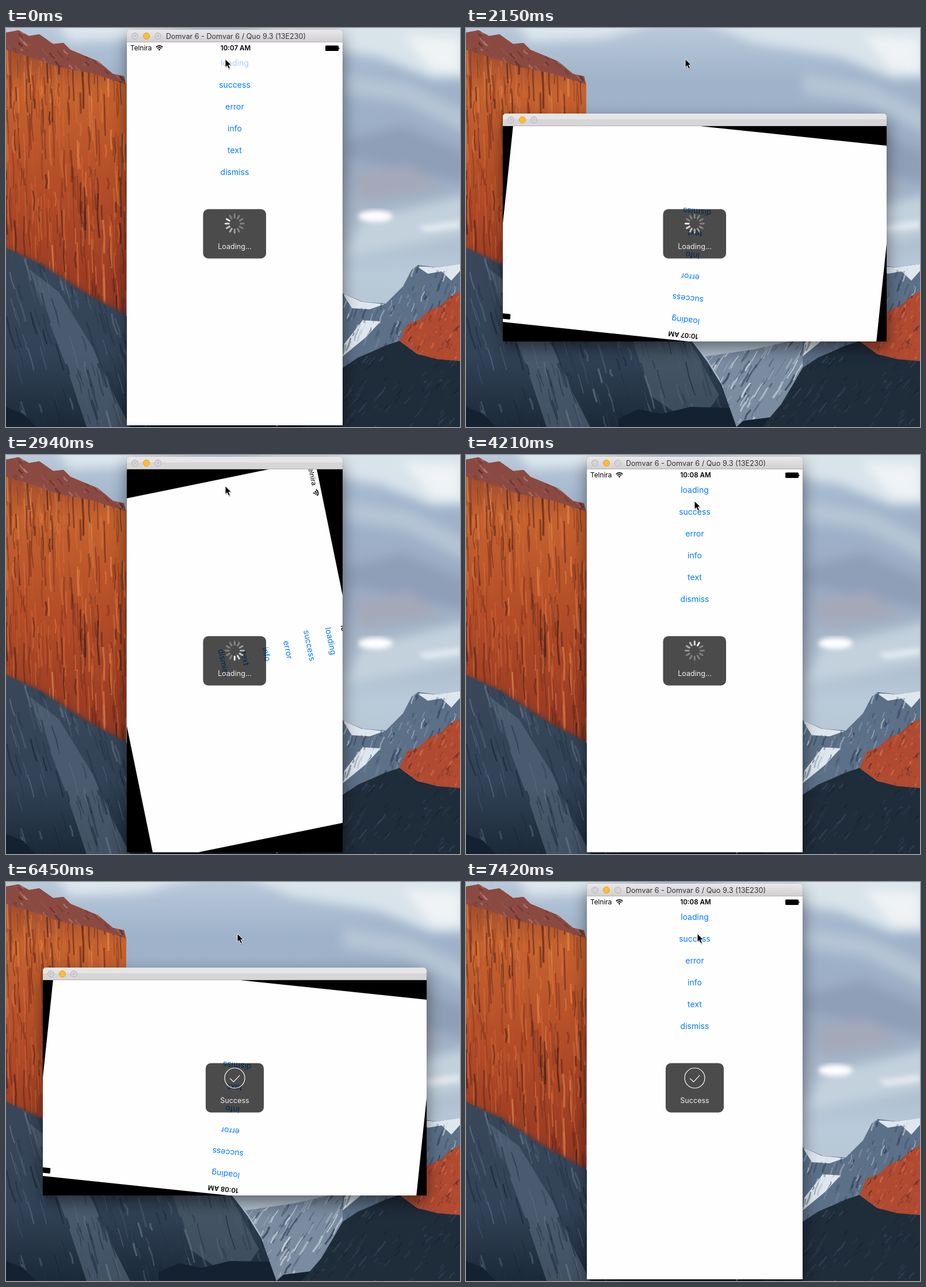
These frames come from a looping animation (789 by 695 pixels, 8000 ms). An HTML page:

```html
<!DOCTYPE html>
<html lang="en">
<head>
<meta charset="utf-8">
<title>Rotating HUD</title>
<style>
  html, body { margin: 0; width: 100%; height: 100%; overflow: hidden; }
  body { position: relative; font-family: Inter, "Open Sans", sans-serif; background: #a9b9cc; }
  #backdrop, #overlay { position: absolute; left: 0; top: 0; width: 789px; height: 695px; }
  #window {
    position: absolute; border-radius: 5px 5px 0 0;
    box-shadow: 0 0 1px rgba(0, 0, 0, .5), 0 12px 28px rgba(0, 0, 0, .48);
  }
  #bar {
    position: relative; height: 21px; border-bottom: 1px solid #b4b1b4; border-radius: 5px 5px 0 0;
    background: linear-gradient(#ebe8eb, #d1cfd2);
  }
  #bar.turning { background: linear-gradient(#e6e5e6 45%, #d7d5d7 50%); }
  #title {
    position: absolute; left: 0; right: 0; top: 0; padding-left: 4px;
    font-size: 12.6px; line-height: 23px; text-align: center; color: #333; white-space: pre;
  }
  .turning #title { visibility: hidden; }
  .light {
    position: absolute; top: 5px; width: 10px; height: 10px;
    border: 1px solid #b9b6b9; border-radius: 50%; background: #d6d3d6;
  }
  .light.amber { background: #ffbd2e; border-color: #e0a028; }
  .dotted .light:not(.amber)::after {
    content: ""; position: absolute; left: 4px; top: 4px; width: 2px; height: 2px;
    border-radius: 50%; background: #aaa7aa;
  }
  #screen { position: relative; overflow: hidden; background: #000; }
  #view { position: absolute; background: #fefefe; }
  .status { position: absolute; top: 0; line-height: 20.5px; font-size: 11.8px; color: #000; }
  #network { left: 6px; white-space: nowrap; }
  #clock { left: 0; right: 0; padding-left: 3px; text-align: center; font-weight: 600; font-size: 11.6px; }
  #view svg { position: absolute; }
  #wifi { left: 50px; top: 4px; }
  #battery { right: 5px; top: 5px; }
  .button {
    position: absolute; left: 0; right: 0; line-height: 20px;
    text-align: center; font-size: 14px; color: #007aff;
  }
  #overlay text { font-size: 12.6px; fill: #f0f0f0; text-anchor: middle; }
</style>
</head>
<body>
<svg id="backdrop" viewBox="0 0 789 695">
  <defs>
    <linearGradient id="sky" x1="0" y1="0" x2="0" y2="1">
      <stop offset="0" stop-color="#b9c9da"/><stop offset=".13" stop-color="#9fb3ca"/>
      <stop offset=".35" stop-color="#9aabc2"/><stop offset=".48" stop-color="#a9b8ca"/>
      <stop offset=".62" stop-color="#b9cad9"/><stop offset="1" stop-color="#aebac8"/>
    </linearGradient>
    <linearGradient id="lit" x1="0" y1="0" x2="0" y2="1">
      <stop offset="0" stop-color="#8a4030"/><stop offset=".2" stop-color="#c5632f"/>
      <stop offset=".55" stop-color="#b24b27"/><stop offset="1" stop-color="#8f3522"/>
    </linearGradient>
    <linearGradient id="shade" x1="0" y1="0" x2="0" y2="1">
      <stop offset="0" stop-color="#394759"/><stop offset=".6" stop-color="#324357"/><stop offset="1" stop-color="#1b2938"/>
    </linearGradient>
    <filter id="soft" x="-50%" y="-50%" width="200%" height="200%"><feGaussianBlur stdDeviation="9"/></filter>
    <filter id="edge"><feGaussianBlur stdDeviation="4"/></filter>
    <clipPath id="cliffClip"><path id="cliffShape" d="M0 8 22 4 40 14 58 11 82 28 100 26 112 38 160 58 186 80 205 84 209 98V520H0Z"/></clipPath>
    <clipPath id="capClip"><path id="capShape" d="M0 8 22 4 40 14 58 11 82 28 100 26 112 38 160 58 186 80 205 84 208 98 150 79 92 68 40 50 0 38Z"/></clipPath>
    <clipPath id="rockClip"><path id="rockShape" d="M0 383 60 412 140 465 210 502 260 545H392L420 582 470 664 474 695H0Z"/></clipPath>
    <clipPath id="snowClip"><path id="snowShape" d="M416 572 500 560 560 546H650L610 600 520 695H470L440 610Z"/></clipPath>
    <clipPath id="domeClip"><path id="domeShape" d="M585 462 620 477 660 480 690 450 705 421 716 413 750 417 789 411V470L690 545 585 610Z"/></clipPath>
    <clipPath id="ridgeClip"><path id="ridgeShape" d="M789 459 772 468 755 484 735 492 718 508 696 517 684 545 715 568 750 577 789 580Z"/></clipPath>
    <clipPath id="woodClip"><path id="woodShape" d="M585 592 612 574 640 562 660 553 684 545 715 568 789 580V695H514L548 655Z"/></clipPath>
  </defs>
  <path fill="url(#sky)" d="M0 0H789V695H0Z"/>
  <g filter="url(#soft)">
    <path fill="#dbe5ec" d="M80-20H360L240 18 110 24Z"/>
    <path fill="#d8e3ea" d="M390-20H820V85L740 88 650 50 500 26Z"/>
    <path fill="#eff3f5" d="M690 12 789 18V78L740 74Z"/>
    <path fill="#b4c4d4" d="M585 78 700 96 810 150V190L690 130 585 115Z"/>
    <path fill="#8f9fb7" d="M590 195 690 170 800 220V270L690 245 590 225Z"/>
    <path fill="#a4a9ba" d="M600 255 700 238 760 280 620 300Z"/>
    <path fill="#c3d1dd" d="M620 335 800 290V360L585 400Z"/>
  </g>
  <g filter="url(#edge)" fill="#fff">
    <ellipse cx="642" cy="328" rx="30" ry="10"/>
    <path d="M715 345 789 335V348L730 356Z" opacity=".5"/>
  </g>
  <use href="#cliffShape" fill="url(#lit)"/>
  <g id="cliff" clip-path="url(#cliffClip)"></g>
  <use href="#capShape" fill="#8b4a41"/>
  <g id="cap" clip-path="url(#capClip)"></g>
  <path clip-path="url(#cliffClip)" filter="url(#edge)" fill="#3f3a45" d="M-20 376 60 410 140 462 220 506V540H-20Z"/>
  <use href="#rockShape" fill="url(#shade)"/>
  <path fill="#5b6b7f" opacity=".6" d="M40 420 92 460 150 555 188 640 216 695H140L105 590Z"/>
  <path fill="#536170" opacity=".6" d="M290 546H390L440 640 400 695 320 640Z"/>
  <g id="rock" clip-path="url(#rockClip)"></g>
  <path fill="#142130" d="M0 660 30 672 52 695H0ZM265 680 300 664 340 672 390 660 476 662 490 682 530 676V695H265Z"/>
  <use href="#snowShape" fill="#7b8ca1"/>
  <g id="snow" clip-path="url(#snowClip)"></g>
  <path fill="#142130" d="M470 695 482 684 530 678V695Z"/>
  <use href="#domeShape" fill="#5c7088"/>
  <path fill="#dfe7ee" d="M714 415 750 417 789 411V423L774 440 757 424 733 428ZM585 462 618 477 658 481 632 490 601 488ZM588 550 620 509 651 511 625 539 585 572Z"/>
  <g id="dome" clip-path="url(#domeClip)"></g>
  <use href="#woodShape" fill="#1f2c3a"/>
  <g id="wood" clip-path="url(#woodClip)"></g>
  <use href="#ridgeShape" fill="#b04a31"/>
  <g id="ridge" clip-path="url(#ridgeClip)"></g>
</svg>

<div id="window">
  <div id="bar">
    <i class="light" style="left:8px"></i><i class="light amber" style="left:28px"></i><i class="light" style="left:48px"></i>
    <div id="title">Domvar 6 - Domvar 6 / Quo 9.3 (13E230)</div>
  </div>
  <div id="screen">
    <div id="view">
      <div class="status" id="network">Telnira</div>
      <svg id="wifi" width="13" height="11" viewBox="0 0 13 11" fill="none" stroke="#000" stroke-width="1.8">
        <path d="M.8 4.3A8.1 8.1 0 0 1 12.2 4.3M3 6.7A5 5 0 0 1 10 6.7"/>
        <path d="M6.5 10.6 4.6 8.5A2.8 2.8 0 0 1 8.4 8.5Z" fill="#000" stroke="none"/>
      </svg>
      <div class="status" id="clock"></div>
      <svg id="battery" width="25" height="11" viewBox="0 0 25 11">
        <rect y=".5" width="23" height="9.5" rx="1.6"/><path d="M23.4 3.5Q26 5.3 23.4 7.2Z"/>
      </svg>
    </div>
  </div>
</div>

<svg id="overlay" viewBox="0 0 789 695">
  <g id="loadingHud">
    <rect x="342.5" y="315.5" width="109.5" height="86" rx="9" fill-opacity=".7"/>
    <g id="spinner" transform="translate(397.3 340.8)" stroke="#fff" stroke-width="3" stroke-linecap="round"></g>
    <text x="397.5" y="384.5">Loading...</text>
  </g>
  <g id="successHud">
    <rect x="347" y="315.5" width="101" height="86" rx="9" fill-opacity=".7"/>
    <g fill="none" stroke="#fff" stroke-width="1.2">
      <circle cx="397.5" cy="341.5" r="17.5"/><path d="M389.3 342.2 395.5 348.2 406.3 336.6"/>
    </g>
    <text x="397.5" y="384.5">Success</text>
  </g>
  <g id="cursor">
    <path d="M1 2V16L4 13 6.6 19 9.5 17.6 7 12H11.5Z" opacity=".25"/>
    <path d="M0 0V14.6L3.3 11.5 5.8 17.2 8.5 16 6.1 10.4H10.6Z" stroke="#fff" stroke-width="1"/>
  </g>
</svg>

<script>
const LOOP = 8000, STEP = 89, LONG = 667, SHORT = 375;
const $ = id => document.getElementById(id);
const lerp = (a, b, p) => a + (b - a) * p;
const clamp = x => Math.max(0, Math.min(1, x));
const ease = x => (1 - Math.cos(Math.PI * clamp(x))) / 2;

function addSvg(parent, tag, attrs) {
  const node = document.createElementNS("http://www.w3.org/2000/svg", tag);
  for (const key in attrs) node.setAttribute(key, attrs[key]);
  return parent.appendChild(node);
}

let seed = 7;
function random(min, max) {
  seed = (seed * 16807) % 2147483647;
  return min + (max - min) * seed / 2147483647;
}

// Fills a box with slanted strokes; the group's clip path trims them to the rock.
function streaks(id, count, [x, y, w, h], length, slant, colors) {
  for (let i = 0; i < count; i++) {
    const dy = random(.2, 1) * length, dx = dy * slant;
    const bend = random(-2.5, 2.5);
    addSvg($(id), "path", {
      d: `M${random(x, x + w)} ${random(y - length / 2, y + h)}l${dx / 2 + bend} ${dy / 2} ${dx / 2 - bend} ${dy / 2}`,
      fill: "none", stroke: colors[i % colors.length],
      "stroke-width": random(.8, 3.6), opacity: random(.2, .7)
    });
  }
}
streaks("cliff", 420, [0, 40, 210, 440], 80, .03, ["#e98c4c", "#5e241b", "#d8713a", "#8a3522", "#3a1c1b", "#c45a30"]);
streaks("cap", 130, [0, 5, 210, 90], 14, .9, ["#b98380", "#5a2b28", "#a4564a", "#3f2224"]);
streaks("rock", 360, [0, 390, 470, 300], 60, .28, ["#506176", "#182635", "#63738a", "#203145", "#2a3a4e"]);
streaks("snow", 170, [415, 545, 230, 140], 32, -.6, ["#e6ecf1", "#3a4c62", "#cfd9e3", "#2b3c50"]);
streaks("dome", 190, [585, 420, 204, 165], 24, -.35, ["#cfd9e2", "#34475d", "#8193a8", "#435871", "#24364a"]);
streaks("wood", 150, [515, 550, 274, 145], 18, -.8, ["#2e3e50", "#131f2b", "#37485b"]);
streaks("ridge", 160, [684, 455, 105, 125], 11, -.5, ["#d77450", "#59292a", "#c4573a", "#7d3329"]);

const buttons = {};
["loading", "success", "error", "info", "text", "dismiss"].forEach((name, i) => {
  const button = buttons[name] = document.createElement("div");
  button.className = "button";
  button.textContent = name;
  button.style.top = 26 + 38 * i + "px";
  $("view").append(button);
});

const spokes = Array.from({ length: 12 }, (_, i) =>
  addSvg($("spinner"), "path", { d: "M0-10.2V-16", transform: `rotate(${i * 30})` }));

// Each turn: when it starts and settles, window shape, content angles, pause after the first step.
const turns = [
  { at: 0, end: 0, wide: false, from: 0, to: 0, hold: 0 },
  { at: 530, end: 700, wide: true, from: 90, to: 0, hold: 0 },
  { at: 1360, end: 1450, wide: false, from: 90, to: 90, hold: 0 },
  { at: 2150, end: 2680, wide: true, from: 180, to: 360, hold: 0 },
  { at: 2940, end: 3210, wide: false, from: 90, to: 0, hold: 180 },
  { at: 5360, end: 5560, wide: true, from: 90, to: 0, hold: 0 },
  { at: 5920, end: 6010, wide: false, from: 90, to: 90, hold: 0 },
  { at: 6450, end: 6980, wide: true, from: 180, to: 360, hold: 180 },
  { at: 7150, end: 7420, wide: false, from: 90, to: 0, hold: 180 }
];

function track(keys, t) {
  const last = keys[keys.length - 1];
  if (t >= last[0]) return last.slice(1);
  const i = Math.max(1, keys.findIndex(key => key[0] >= t));
  const a = keys[i - 1], b = keys[i], p = clamp((t - a[0]) / (b[0] - a[0]));
  return a.slice(1).map((v, k) => lerp(v, b[k + 1], p));
}
const spin = [[0, 10], [2150, 33], [2940, 42], [4210, 61], [4740, 67]];
const pointer = [[0, 381, 54], [3900, 381, 54], [4210, 397, 80], [4560, 402, 90]];

function place(node, x, y, w, h) {
  Object.assign(node.style, { left: x + "px", top: y + "px", width: w + "px", height: h + "px" });
}

function drawWindow(t) {
  const turn = turns.filter(k => t >= k.at).pop();
  const turning = t < turn.end, d = t - turn.at;
  const dt = d < turn.hold ? 0 : Math.floor(d / STEP) * STEP;
  const duration = Math.abs(turn.to - turn.from) / 90 * 300 || 1;
  const p = turning ? ease((dt + 70) / duration) : 1;

  const [w, h] = turn.wide ? [LONG, SHORT] : [SHORT, LONG];
  place($("window"), 397.5 - w / 2, turn.wide ? 149 : 3, w, h + 22);
  place($("screen"), 0, 0, w, h);
  $("bar").className = (turning ? "turning " : "") + (turning || t < 530 ? "dotted" : "");

  // A turn ending upright swaps the view's sides; otherwise it stays landscape.
  const upright = turn.to === 0;
  const vw = upright ? lerp(h, w, p) : LONG, vh = upright ? lerp(w, h, p) : SHORT;
  place($("view"), (w - vw) / 2, (h - vh) / 2, vw, vh);
  const angle = lerp(turn.from, turn.to, p) % 360;
  $("view").style.transform = angle ? `rotate(${angle}deg)` : "none";
}

function draw(t) {
  drawWindow(t);
  $("clock").textContent = t < 3500 ? "10:07 AM" : "10:08 AM";
  buttons.loading.style.opacity = lerp(.35, 1, clamp(t / 350));
  buttons.success.style.opacity = t < 4650 ? 1 : lerp(.2, 1, clamp((t - 4700) / 390));

  const done = t >= 4740;
  $("loadingHud").style.display = done ? "none" : "";
  $("successHud").style.display = done ? "" : "none";
  const head = Math.floor(track(spin, t)[0] + .01);
  spokes.forEach((spoke, i) => {
    const age = ((head - i) % 12 + 12) % 12;
    spoke.setAttribute("opacity", Math.max(.3, .92 - age * .12));
  });

  const [x, y] = track(pointer, t);
  $("cursor").setAttribute("transform", `translate(${Math.round(x)} ${Math.round(y)})`);
}

const start = performance.now();
function frame() {
  draw((performance.now() - start) % LOOP);
  requestAnimationFrame(frame);
}
frame();
</script>
</body>
</html>
```
